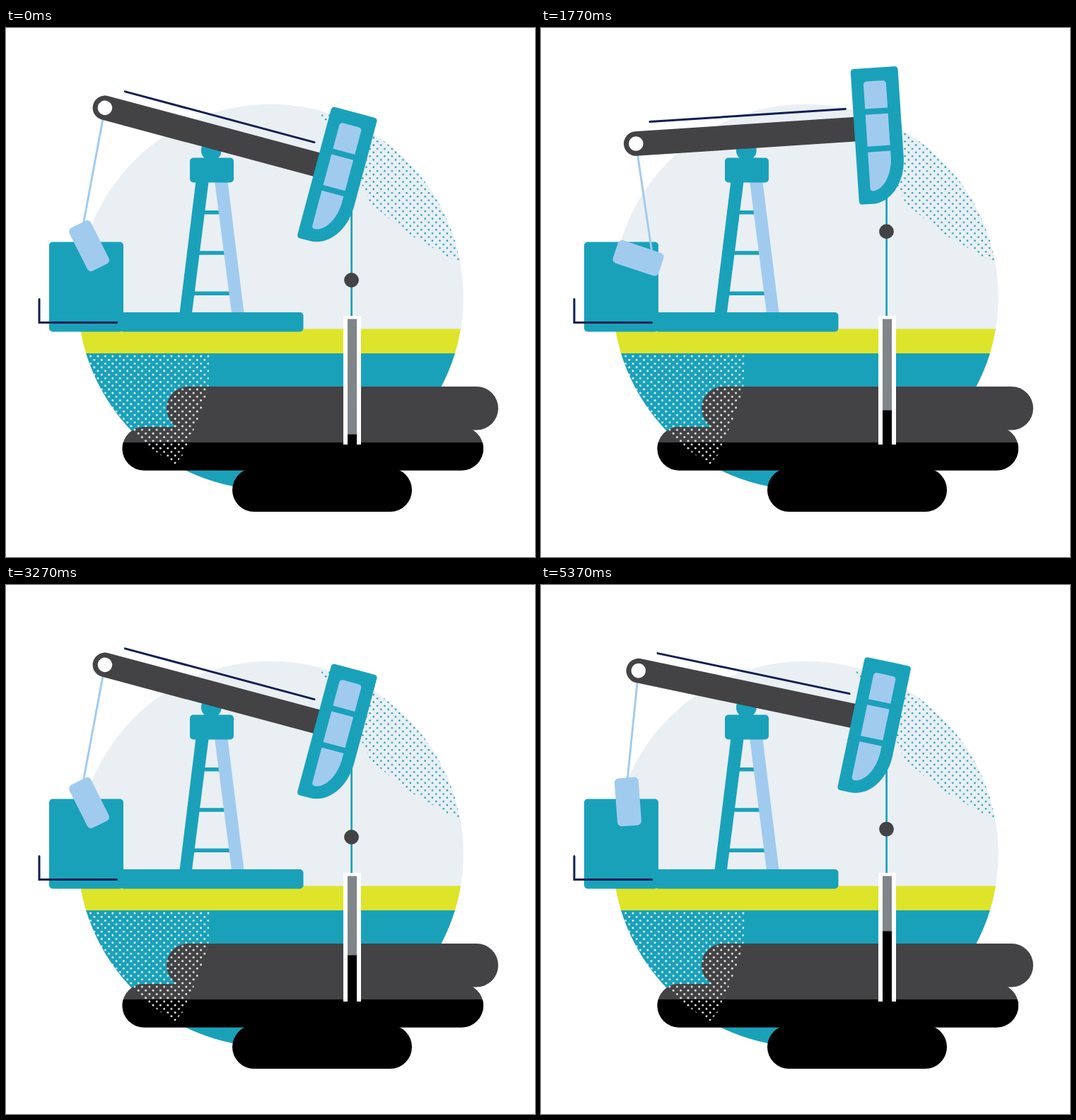
Write an HTML page that moves like this. It is 748 px wide and 748 px high and loops after 5400 ms.

```html
<!DOCTYPE html>
<html lang="en">
<head>
<meta charset="utf-8">
<title>Pump jack</title>
<style>
  html, body { margin: 0; width: 100%; height: 100%; overflow: hidden; background: #fff; }
  svg { display: block; width: 100vw; height: 100vh; }
  .teal { fill: #1aa1ba; }
  .light { fill: #a0cbef; }
  .dark { fill: #434345; }
  .navy { fill: none; stroke: #0e1f52; stroke-width: 3; stroke-linecap: round; }
  .rungs { stroke: #1aa1ba; stroke-width: 5.6; }
</style>
</head>
<body>
<svg viewBox="0 0 748 748">
  <defs>
    <clipPath id="disc"><circle cx="374" cy="380.5" r="272.7"/></clipPath>
    <pattern id="whiteDots" x="283.4" y="461.6" width="10.4" height="10.4" patternUnits="userSpaceOnUse">
      <g fill="#fff"><circle cx="2.6" cy="2.6" r="1.4"/><circle cx="7.8" cy="7.8" r="1.4"/></g>
    </pattern>
    <pattern id="tealDots" x="444.4" y="121.4" width="10.4" height="10.4" patternUnits="userSpaceOnUse">
      <g class="teal"><circle cx="2.6" cy="2.6" r="1.3"/><circle cx="7.8" cy="7.8" r="1.3"/></g>
    </pattern>
  </defs>

  <g clip-path="url(#disc)">
    <rect x="100" y="100" width="550" height="326" fill="#eaeff4"/>
    <rect x="100" y="425.5" width="550" height="35" fill="#dee42a"/>
    <rect class="teal" x="100" y="460" width="550" height="200"/>
    <path fill="url(#tealDots)" d="M444 121 L540 120 L660 240 L642 333 L570 292 L515 248 L496 205 L470 160Z"/>
  </g>

  <!-- oil layers -->
  <rect class="dark" x="227" y="507" width="469" height="61.5" rx="30.7"/>
  <rect class="dark" x="164.5" y="564" width="510.5" height="61.5" rx="30.7"/>
  <path d="M165.7 586 H673.8 Q675 590 675 594.8 A30.7 30.7 0 0 1 644.3 625.5 H195.2 A30.7 30.7 0 0 1 164.5 594.8 Q164.5 590 165.7 586Z"/>
  <rect x="320" y="622.5" width="254" height="61.5" rx="30.7"/>
  <path fill="url(#whiteDots)" d="M111 461 H288 L286 512 L269 560 L250 604 L238 618 L205 594 L176 569 L135 517Z"/>

  <!-- polished rod and well -->
  <path d="M488.6 200 V409" stroke="#1aa1ba" stroke-width="2.7"/>
  <circle id="weight" class="dark" cx="488.5" r="10.4"/>
  <rect x="477" y="407" width="25" height="182" fill="#fff"/>
  <rect x="483" y="411.5" width="13" height="177" fill="#808589"/>
  <rect id="oil" x="483" width="13"/>

  <!-- tower and base -->
  <path class="rungs" d="M278 260.8 H304 M272 318 H311 M264 375.2 H319"/>
  <path class="teal" d="M268.5 216 H286.7 L263 403 H245.5Z"/>
  <path class="light" d="M295 216 H313.3 L336.5 403 H319Z"/>
  <circle class="teal" cx="290.3" cy="173" r="14.4"/>
  <rect class="teal" x="260" y="183.5" width="62" height="35" rx="5"/>
  <rect class="teal" x="61" y="302.5" width="105" height="127" rx="5"/>
  <rect class="teal" x="161" y="402" width="259.5" height="27.5" rx="5"/>
  <path class="navy" d="M47 383.5 V416.5 H156.5"/>

  <line id="cable" stroke="#a0cbef" stroke-width="2.9"/>
  <rect id="crank" class="light" x="-17" y="-48.3" width="34" height="68" rx="6"/>

  <g id="beam">
    <path class="dark" d="M160 -19.1 H-156.4 A17.3 17.3 0 0 0 -156.4 15.5 H160Z"/>
    <circle cx="-156.4" cy="-1.8" r="10.3" fill="#fff"/>
    <path class="navy" d="M-134.8 -31.4 H142.2"/>
    <path class="teal" d="M158 -87 H215 Q220 -87 220 -82 V42 A48 63 0 0 1 172 105 H158 Q153 105 153 100 V-82 Q153 -87 158 -87Z"/>
    <path class="light" d="M170 -29.5 V-63 Q170 -68.2 175 -68.2 H197 Q202 -68.2 202 -63 V-29.5Z
      M170 -21.3 H202 V23.7 H170Z
      M170 31.8 H202 V40 C202 65 189 86 174.5 87 Q170 87 170 82.5Z"/>
  </g>
</svg>
<script>
  const LOOP = 5400, CYCLE = 28.8, RESTART = 29;
  const PIVOT = [290.5, 155.1], AXLE = [124, 320.8];
  const get = id => document.getElementById(id);
  const set = (id, attrs) => {
    for (const key in attrs) get(id).setAttribute(key, attrs[key]);
  };

  // Point (x, y) turned by deg and moved to the given centre.
  function place([cx, cy], x, y, deg) {
    const a = deg * Math.PI / 180, c = Math.cos(a), s = Math.sin(a);
    return [cx + x * c - y * s, cy + x * s + y * c];
  }

  // 24 fps motion on a 30 ms clock: the first of every four poses lasts two ticks.
  function poseAt(time) {
    const t = time % LOOP;
    return 4 * Math.floor(t / 150) + Math.max(0, Math.floor(t % 150 / 30) - 1);
  }

  function draw() {
    const pose = poseAt(performance.now());
    const phase = pose % RESTART, stroke = Math.floor(pose / RESTART);
    const half = CYCLE / 2;
    const tilt = -10 + 25 * Math.abs(phase - half) / half;
    const spin = -26.7 - 360 * phase / CYCLE;
    const level = 574.6 - 17.02 * (stroke + Math.min(1, phase / half));

    set('beam', { transform: `translate(${PIVOT}) rotate(${tilt})` });
    set('crank', { transform: `translate(${AXLE}) rotate(${spin})` });
    const [x1, y1] = place(PIVOT, -156.4, -1.8, tilt);
    const [x2, y2] = place(AXLE, 0, -37, spin);
    set('cable', { x1, y1, x2, y2 });
    set('weight', { cy: 301.5 + 3.667 * tilt });
    set('oil', { y: level, height: 589 - level });
    requestAnimationFrame(draw);
  }
  draw();
</script>
</body>
</html>
```
